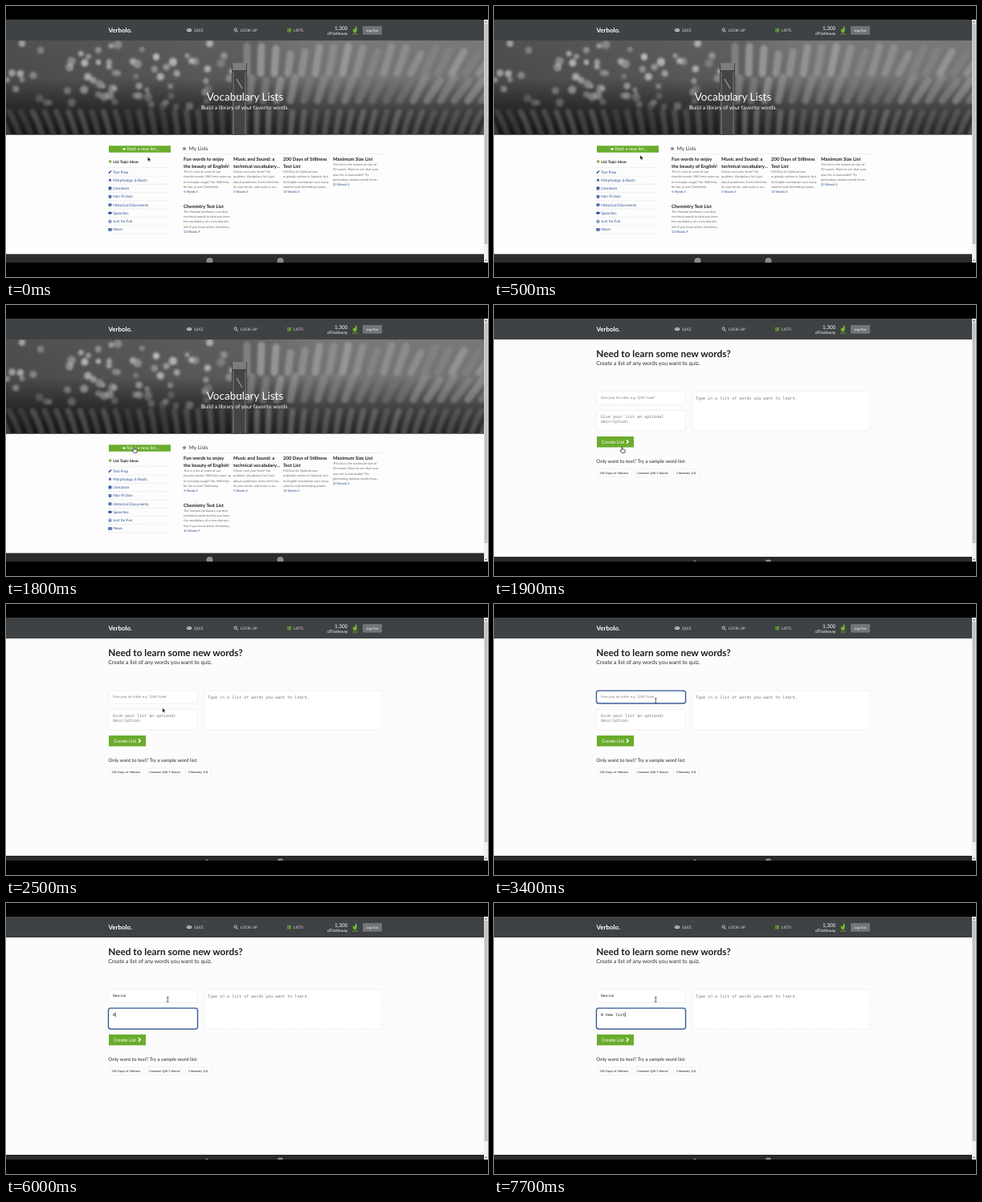
Write an HTML page that moves like this. It is 600 by 338 pixels and loops after 8 s.

```html
<!DOCTYPE html>
<html lang="en">
<head>
<meta charset="utf-8">
<title>Vocabulary lists</title>
<style>
html, body { margin: 0; width: 100%; height: 100%; overflow: hidden; background: #000; }
svg { display: block; width: 100vw; height: 100vh; text-rendering: geometricPrecision; }
text { font-family: Lato, sans-serif; white-space: pre; }
.b { font-weight: 700; }
.mono { font-family: "DejaVu Sans Mono", monospace; }
.arial { font-family: "Liberation Sans", sans-serif; }
</style>
</head>
<body>
<svg id="stage" viewBox="0 0 600 338"></svg>
<script>
const LOOP = 8000, SWITCH = 1900, TITLE_FOCUS = 2800, DESC_FOCUS = 5100;
const GREEN = '#6aac2c', BLUE = '#2c4f91', INK = '#1e1e1e', HEAD = '#3f4244';
const stage = document.getElementById('stage');

const rect = (x, y, w, h, fill, extra = '') =>
  `<rect x="${x}" y="${y}" width="${w}" height="${h}" fill="${fill}" ${extra}/>`;
const text = (x, y, size, fill, str, cls = '', extra = '') =>
  `<text x="${x}" y="${y}" font-size="${size}" fill="${fill}" class="${cls}" ${extra}>${str}</text>`;
const path = (d, stroke, width = 1, extra = '') =>
  `<path d="${d}" fill="none" stroke="${stroke}" stroke-width="${width}" ${extra}/>`;
const circle = (x, y, r, fill, extra = '') =>
  `<circle cx="${x}" cy="${y}" r="${r}" fill="${fill}" ${extra}/>`;
const hair = (x1, x2, y) => path(`M${x1} ${y}H${x2}`, '#dcdcdc', 0.6, 'stroke-dasharray="1.5 .8"');
const chevron = (x, y, s, color) => path(`M${x} ${y - s}l${s} ${s}l${-s} ${s}`, color, s * 0.6);
const MIDDLE = 'text-anchor="middle"', END = 'text-anchor="end"';

function star(x, y, r, fill) {
  const pts = Array.from({ length: 10 }, (_, i) => {
    const a = i * Math.PI / 5, d = i % 2 ? r * 0.45 : r;
    return `${(x + d * Math.sin(a)).toFixed(2)},${(y - d * Math.cos(a)).toFixed(2)}`;
  });
  return `<polygon points="${pts.join(' ')}" fill="${fill}"/>`;
}

function randomizer(seed) {
  return () => (seed = seed * 16807 % 2147483647) / 2147483647;
}

// Soft grey impression of typewriter bars: bright specks left, thick pale bars right.
function hero() {
  const rnd = randomizer(77);
  const gray = (lo, hi) => { const v = Math.round(lo + rnd() * (hi - lo)); return `rgb(${v},${v},${v})`; };
  const round = 'stroke-linecap="round"';
  let bars = '', dots = '';
  for (let x = 300; x < 640; x += 17) {
    const lean = (x - 300) * 0.06;
    bars += path(`M${x + lean} ${50 + rnd() * 10}L${x} 84`, gray(125, 150), 9, round);
    bars += path(`M${x + 6 + lean} ${88 + rnd() * 8}L${x + 3} 118`, gray(115, 140), 9, round);
  }
  for (let x = -10; x < 615; x += 14) {
    const lean = (x - 300) * 0.05, pale = x < 290 ? 75 : 105;
    bars += path(`M${x + lean} 132Q${x + lean * 0.4} 146 ${x} 164`, gray(pale, pale + 25), 7, round);
  }
  for (let i = 0; i < 75; i++) {
    const x = rnd() * 285, y = 46 + rnd() * 80;
    dots += circle(x, y, 3 + rnd() * 2.5, gray(125, 195), `opacity="${(1.1 - (y - 46) / 130).toFixed(2)}"`);
  }
  return `<g clip-path="url(#heroBox)">${rect(0, 43, 600, 118, 'url(#heroTone)')}
    ${rect(0, 43, 600, 118, 'url(#heroSide)')}
    <g filter="url(#soft)">${bars}${dots}</g>
    ${rect(0, 43, 600, 118, 'url(#heroShade)')}
    <g filter="url(#softer)">${rect(281, 71, 19, 92, '#444')}${rect(282, 71, 17, 9, '#7c7c7c')}
    ${path('M283 82V160M298 82V160', '#686868', 1.6)}${path('M287 91L294 103M287 112H294', '#888', 1.5)}</g></g>`;
}

function header() {
  const pale = '#dcdddd';
  return rect(0, 17, 600, 26, HEAD)
    + text(127.5, 33, 7.9, '#fff', 'Verbolo.', 'b')
    + rect(225, 28.2, 6.2, 3.8, pale, 'rx="1.9"') + circle(227, 30.1, 0.8, HEAD) + circle(229.4, 30.1, 0.8, HEAD)
    + text(234, 32, 4.8, pale, 'QUIZ')
    + circle(285.7, 29.6, 1.6, 'none', `stroke="${pale}" stroke-width=".9"`) + path('M287 31L288.7 32.7', pale)
    + text(292, 32, 4.8, pale, 'LOOK UP')
    + rect(350, 28, 5, 4.4, GREEN) + path('M350 29.5H355M350 31H355M351.3 28V32.4', HEAD, 0.4)
    + text(358, 32, 4.8, pale, 'LISTS')
    + text(425.3, 30, 6.4, '#fff', '1,300', '', END)
    + text(425.3, 35.8, 4.9, '#fff', 'oThistleway', '', END)
    + '<path d="M435 24.6C437.6 27.5 437.5 32.6 434.4 33.4C431.4 32.6 431.4 29.5 432.6 28C433 29.2 433.5 29.6 433.8 29.6C435 28 435.2 26.4 435 24.6Z" fill="#74bb2c"/>'
    + rect(431, 34.4, 7.4, 1.1, '#5d9428')
    + rect(444, 25, 24, 10.8, '#727577', 'rx="1"') + text(456, 31.9, 4.2, '#fff', 'Log Out', '', MIDDLE);
}

const footer = y => rect(0, y, 600, 320 - y, '#292b2c');

function card(x, y, title, lines, count) {
  const top = y + (title.length - 1) * 9;
  return title.map((s, i) => text(x, y + i * 9, 5.95, INK, s, 'b')).join('')
    + lines.map((s, i) => text(x, top + 5.9 + i * 6.3, 4, '#707070', s)).join('')
    + text(x, top + 31, 4, BLUE, `${count} Words`)
    + chevron(x + (count > 9 ? 18.6 : 16.2), top + 29.6, 1.3, BLUE);
}

function listsPage() {
  const topics = ['Test Prep', 'Morphology &amp; Roots', 'Literature', 'Non-Fiction',
    'Historical Documents', 'Speeches', 'Just for Fun', 'News'];
  const icons = [
    y => path(`M127.8 ${y + 1.7}L131 ${y - 1.6}`, BLUE, 1.5),
    y => star(129.5, y, 2.4, BLUE),
    y => rect(127.6, y - 2, 3.8, 4, BLUE, 'rx=".5"') + path(`M128.5 ${y + 1}H131`, '#fff', 0.5),
    y => circle(129.5, y, 2.1, BLUE) + path(`M128 ${y}H131`, '#fff', 0.5),
    y => circle(129.5, y, 2.1, BLUE) + path(`M129.5 ${y - 1.5}V${y + 1.5}`, '#fff', 0.5),
    y => `<ellipse cx="129.5" cy="${y - 0.2}" rx="2.3" ry="1.7" fill="${BLUE}"/>`,
    y => circle(129.5, y, 1.8, 'none', `stroke="${BLUE}" stroke-width=".7"`) + circle(129.5, y + 0.3, 0.8, BLUE),
    y => rect(127.3, y - 1.7, 4.4, 3.4, BLUE) + path(`M128.2 ${y}H131`, '#fff', 0.5)
  ];
  return rect(0, 43, 600, 277, '#fdfdfd') + hero()
    + text(297.5, 118, 13.5, '#fff', 'Vocabulary Lists', '', MIDDLE)
    + text(297.5, 129, 6.78, '#fff', 'Build a library of your favorite words.', '', MIDDLE)
    + rect(128, 174.3, 77, 8.4, GREEN)
    + path('M144.7 178.4H148.3M146.8 176.7L148.5 178.4L146.8 180.1', '#fff', 1)
    + text(150.3, 180.3, 5.6, '#fff', 'Start a new list...')
    + star(129.7, 194, 2.5, GREEN) + text(133.3, 195.6, 4.7, INK, 'List Topic Ideas', 'b')
    + hair(127, 206, 201.5)
    + topics.map((s, i) => {
      const y = 207 + i * 10.27;
      return icons[i](y) + text(133.2, y + 1.6, 4.7, BLUE, s) + hair(127, 206, y + 5.1);
    }).join('')
    + star(222, 178, 3.1, '#8a8a8a') + text(227.7, 180.4, 6.6, '#333', 'My Lists') + hair(219, 470, 184.5)
    + card(221, 193, ['Fun words to enjoy', 'the beauty of English!'],
      ['This is a list of some of our', 'favorite words. Will they come up', 'in everyday usage? No. Will they', 'be fun to use? Definitely.'], 5)
    + card(283, 193, ['Music and Sound: a', 'technical vocabulary...'],
      ["Music's not your forte? No", "problem. Vocabulary isn't just", 'about academics. Every field has', 'its own terms, and music is no...'], 5)
    + card(345, 193, ['200 Days of Stillness', 'Test List'],
      ['Mil Dias de Quietud was', 'originally written in Spanish, but', 'its English translation uses many', 'colorful and interesting words...'], 10)
    + card(407, 193, ['Maximum Size List'],
      ['This list is the maximum size of', '20 words. Want to see that your', 'own list is searchable? Try', 'generating random words from...'], 20)
    + card(221, 251.7, ['Chemistry Test List'],
      ['The Verbolo dictionary can find', 'technical words to help you learn', 'the vocabulary of a new domain.', 'See if you know these chemistry...'], 10)
    + footer(309.4) + circle(253.5, 318, 4, '#8b8d8e') + circle(341.5, 318, 4, '#8b8d8e');
}

const field = (x, y, w, h) => rect(x, y, w, h, '#fff', 'rx="2" stroke="#dedede" stroke-width=".6" stroke-dasharray="1.5 .8"');
const ring = (id, y, h) => `<g id="${id}">${rect(127.2, y - 0.3, 111.6, h + 0.6, 'none', 'rx="3.2" stroke="#b9c8e6" stroke-width="1.8"')}
  ${rect(127.6, y, 110.8, h, '#fff', 'rx="2.8" stroke="#35538f" stroke-width="1.1"')}</g>`;

function createPage() {
  const sample = (x, w, s) => field(x, 204.7, w, 9.6) + text(x + w / 2, 211, 3.85, '#222', s, 'arial', MIDDLE);
  const hint = '#777';
  return rect(0, 43, 600, 277, '#fcfcfc')
    + text(127.3, 65, 11.8, INK, 'Need to learn some new words?', 'b')
    + text(127.3, 75.2, 6.88, '#2c2c2c', 'Create a list of any words you want to quiz.')
    + field(127.5, 108, 111, 16) + field(127.5, 131.5, 111, 25.5) + field(247, 108, 221, 49)
    + ring('titleRing', 108.3, 15.6) + ring('descRing', 131.3, 25.8)
    + `<g id="titleHint">${text(133, 117.4, 4.1, hint, 'Give your list a title. e.g. "QVE Cram"', 'arial')}</g>`
    + `<g id="descHint">${text(133, 141, 5, hint, 'Give your list an optional', 'mono')}${text(133, 147, 5, hint, 'description.', 'mono')}</g>`
    + text(251, 118, 5, hint, 'Type in a list of words you want to learn.', 'mono')
    + text(133, 117.4, 4.25, '#111', '', 'arial', 'id="titleText"')
    + text(133, 141, 5, '#111', '', 'mono', 'id="descText"')
    + path('', '#111', 0.6, 'id="caret"')
    + rect(128, 164, 46, 13.5, GREEN) + text(134, 172.8, 6, '#fff', 'Create List') + chevron(164.9, 170.6, 2.3, '#fff')
    + text(127.3, 196.6, 6.2, '#2c2c2c', 'Only want to test? Try a sample word list:')
    + sample(128, 43, '200 Days of Stillness') + sample(176, 42.5, 'Common QRLT Words') + sample(223.3, 32, 'Chemistry 101')
    + footer(314) + circle(250, 320, 1.6, '#8b8d8e') + circle(341.5, 321.5, 4, '#8b8d8e');
}

const scrollbar = rect(595, 17, 5, 303, '#f1f1f1') + rect(595.5, 22, 4, 275, '#c1c1c1')
  + '<path d="M596 20.4H599L597.5 18.6ZM596 316.8H599L597.5 318.6Z" fill="#555"/>';

const pointers = `
  <g id="arrow"><path d="M0 0V5.8L1.4 4.6L2.3 6.6L3.2 6.2L2.3 4.3H4.1Z" fill="#111" stroke="#fff" stroke-width=".4"/></g>
  <g id="hand"><path d="M-.6 0Q0-.8.6 0V2.3L3.2 3Q4 3.3 3.8 4.3L3.2 6.8H-.5L-2.4 4.2Q-2.2 3.2-.6 4Z" fill="#fff" stroke="#111" stroke-width=".7"/></g>
  <g id="beam">${path('M-1.3-3H-.4L0-2.6L.4-3H1.3M0-2.6V2.6M-1.3 3H-.4L0 2.6L.4 3H1.3', '#222', 0.7)}</g>`;

stage.innerHTML = `<defs>
  <clipPath id="heroBox">${rect(0, 43, 600, 117.4, '#000')}</clipPath>
  <filter id="soft"><feGaussianBlur stdDeviation="1.6"/></filter>
  <filter id="softer"><feGaussianBlur stdDeviation=".7"/></filter>
  <linearGradient id="heroTone" x2="0" y2="1"><stop stop-color="#707070"/><stop offset=".4" stop-color="#6a6a6a"/><stop offset=".7" stop-color="#484848"/><stop offset="1" stop-color="#2c2c2c"/></linearGradient>
  <linearGradient id="heroSide"><stop stop-color="#000" stop-opacity=".3"/><stop offset=".5" stop-color="#000" stop-opacity=".15"/><stop offset=".7" stop-color="#fff" stop-opacity=".06"/><stop offset="1" stop-color="#fff" stop-opacity=".06"/></linearGradient>
  <linearGradient id="heroShade" x2="0" y2="1"><stop offset=".4" stop-color="#000" stop-opacity="0"/><stop offset="1" stop-color="#000" stop-opacity=".35"/></linearGradient>
  </defs>${rect(0, 0, 600, 338, '#000')}
  <g id="lists">${listsPage()}</g><g id="create">${createPage()}</g>
  ${header()}${scrollbar}${rect(0, 320, 600, 18, '#000')}${pointers}`;

const el = id => document.getElementById(id);
const show = (id, on) => el(id).setAttribute('display', on ? 'inline' : 'none');
const clamp = v => Math.max(0, Math.min(1, v));

// Pointer stops: time, x, y.
const route = [[0, 176.4, 188], [100, 176.4, 188], [500, 182, 186], [1200, 182, 186],
  [1700, 159.5, 177.5], [2200, 159.5, 177.5], [2600, 201.3, 120.5], [LOOP, 201.3, 120.5]];
const titleKeys = [[3600, 'N'], [3900, 'Ne'], [4000, 'New'], [4400, 'New L'], [4600, 'New Li'], [4800, 'New List']];
const descKeys = [[5800, 'A'], [6500, 'A '], [6600, 'A n'], [6700, 'A ne'], [6800, 'A new'],
  [7200, 'A new l'], [7500, 'A new li'], [7600, 'A new lis'], [7700, 'A new list']];

const typed = (keys, t) => keys.reduce((s, [at, str]) => t >= at ? str : s, '');

function pointerAt(t) {
  const i = Math.max(1, route.findIndex(stop => stop[0] > t));
  const [t0, x0, y0] = route[i - 1], [t1, x1, y1] = route[i];
  const p = (t - t0) / (t1 - t0), k = p * p * (3 - 2 * p);
  return [x0 + (x1 - x0) * k, y0 + (y1 - y0) * k];
}

function render(now) {
  const t = Math.floor(now % LOOP / 100) * 100;
  const creating = t >= SWITCH, inDesc = t >= DESC_FOCUS;
  show('lists', !creating);
  show('create', creating);

  const title = typed(titleKeys, t), desc = typed(descKeys, t);
  el('titleText').textContent = title;
  el('descText').textContent = desc;
  show('titleHint', !title);
  show('descHint', !desc);
  el('titleRing').setAttribute('opacity', inDesc ? 0 : clamp((t - TITLE_FOCUS + 100) / 200));
  el('descRing').setAttribute('opacity', inDesc ? 1 : 0);

  const caretX = 133.3 + (creating ? el(inDesc ? 'descText' : 'titleText').getComputedTextLength() : 0);
  el('caret').setAttribute('d', inDesc ? `M${caretX} 136.2V142.2` : `M${caretX} 113.5V118.5`);
  show('caret', title ? true : t >= TITLE_FOCUS && t < 3400);

  const [x, y] = pointerAt(t);
  const kind = creating
    ? (y > 164 && y < 178 ? 'hand' : x < 239 && (y < 124 || y > 131 && y < 157) ? 'beam' : 'arrow')
    : (y < 183 ? 'hand' : 'arrow');
  for (const id of ['arrow', 'hand', 'beam']) show(id, id === kind);
  el(kind).setAttribute('transform', `translate(${x.toFixed(2)} ${y.toFixed(2)})`);
}

const start = performance.now();
function tick() {
  render(performance.now() - start);
  requestAnimationFrame(tick);
}
tick();
</script>
</body>
</html>
```
